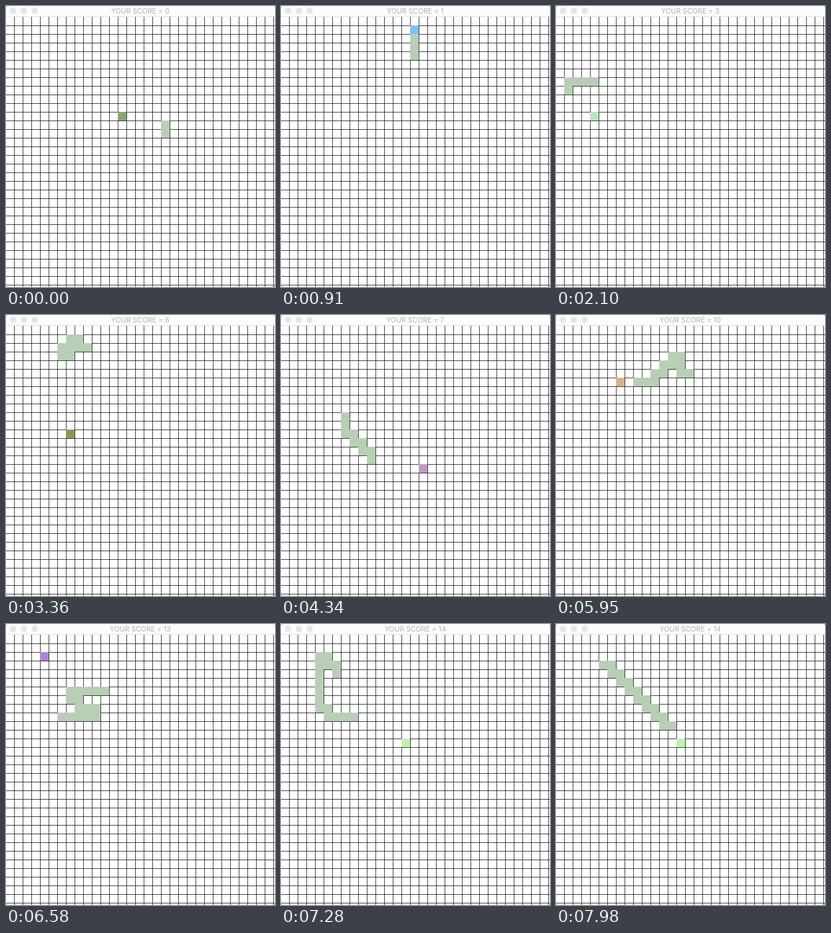
An HTML page with a canvas that plays this animation: 498x520 px, repeating every 8 s.

```html
<!DOCTYPE html>
<html lang="en">
<head>
<meta charset="utf-8">
<title>Snake</title>
<style>
  html, body { margin: 0; width: 100%; height: 100%; overflow: hidden; background: #8a8a8a; }
  canvas { display: block; }
</style>
</head>
<body>
<canvas id="stage" width="498" height="520"></canvas>
<script>
const ctx = document.getElementById('stage').getContext('2d');
const WIDTH = 498, HEIGHT = 520, BAR = 20, CELL = 16;
const LOOP = 8000, TICK = 70, CELLS_PER_TICK = 1.307, PHASE = 0.45;
const SNAKE_COLOR = '#b8cfb6', LINE_COLOR = '#1c1c1c';
const MOVES = { L: [-1, 0], R: [1, 0], U: [0, -1], D: [0, 1] };

// Each leg leads to the next piece of food: moves (a number repeats the group before it), food color.
const legs = [
  ['L U L4', '#83a672'],
  ['UR2 U8', '#7cc3f5'],
  ['LD6 L8', '#d9a7a0'],
  ['DR3 D', '#bbe4c4'],
  ['RU3 U5', '#c8b07a'],
  ['LU', '#8fb5c9'],
  ['RURDR DL2 D8', '#8a9a54'],
  ['RD4 R5', '#c59ac0'],
  ['U10', '#9fc98a'],
  ['LU2 U', '#949be9'],
  ['LD3 L4', '#d8b48c'],
  ['DRDRRD', '#86c5b4'],
  ['L4', '#c99aa8'],
  ['LU2 U5', '#ad85d6'],
  ['RD10', '#bff4ae']
];

const expand = text => text.replace(/([A-Z]+)(\d*)\s*/g, (_, group, n) => group.repeat(n || 1));

const path = [[18, 13], [18, 12]];
const foods = legs.map(([moves, color]) => {
  for (const move of expand(moves)) {
    const [x, y] = path[path.length - 1], [dx, dy] = MOVES[move];
    path.push([x + dx, y + dy]);
  }
  return { cell: path[path.length - 1], color, eatenAt: path.length - 2 };
});

function fillCell([col, row], color) {
  ctx.fillStyle = color;
  ctx.fillRect(col * CELL - 1, BAR + row * CELL, CELL, CELL);
}

function drawGrid() {
  ctx.fillStyle = LINE_COLOR;
  for (let x = CELL - 1; x < WIDTH; x += CELL) ctx.fillRect(x, BAR, 1, HEIGHT);
  for (let y = BAR + CELL; y < HEIGHT; y += CELL) ctx.fillRect(0, y, WIDTH, 1);
}

function drawTitleBar(score) {
  ctx.fillStyle = '#fcfcfc';
  ctx.fillRect(0, 0, WIDTH, BAR);
  ctx.fillStyle = '#dadada';
  ctx.fillRect(0, BAR - 1, WIDTH, 1);
  ctx.fillStyle = '#e6e6e6';
  for (const x of [13, 33, 53]) {
    ctx.beginPath();
    ctx.arc(x, 9, 6, 0, Math.PI * 2);
    ctx.fill();
  }
  ctx.fillStyle = '#b2b2b2';
  ctx.font = '13px Inter, Roboto, sans-serif';
  ctx.textAlign = 'center';
  ctx.fillText('YOUR SCORE = ' + score, 248.5, 14);
}

function draw(time) {
  const tick = Math.floor((time % LOOP) / TICK);
  const steps = Math.floor(tick * CELLS_PER_TICK + PHASE);
  const score = foods.filter(food => food.eatenAt <= steps).length;
  const head = steps + 1;

  ctx.clearRect(0, 0, WIDTH, HEIGHT);
  ctx.save();
  ctx.beginPath();
  ctx.roundRect(0, 0, WIDTH, HEIGHT, 4);
  ctx.clip();
  ctx.fillStyle = '#fff';
  ctx.fillRect(0, 0, WIDTH, HEIGHT);
  drawGrid();
  fillCell(foods[score].cell, foods[score].color);
  path.slice(head - score - 1, head + 1).forEach(cell => fillCell(cell, SNAKE_COLOR));
  drawTitleBar(score);
  ctx.restore();
}

const start = performance.now();
function loop() {
  draw(performance.now() - start);
  requestAnimationFrame(loop);
}
loop();
</script>
</body>
</html>
```
